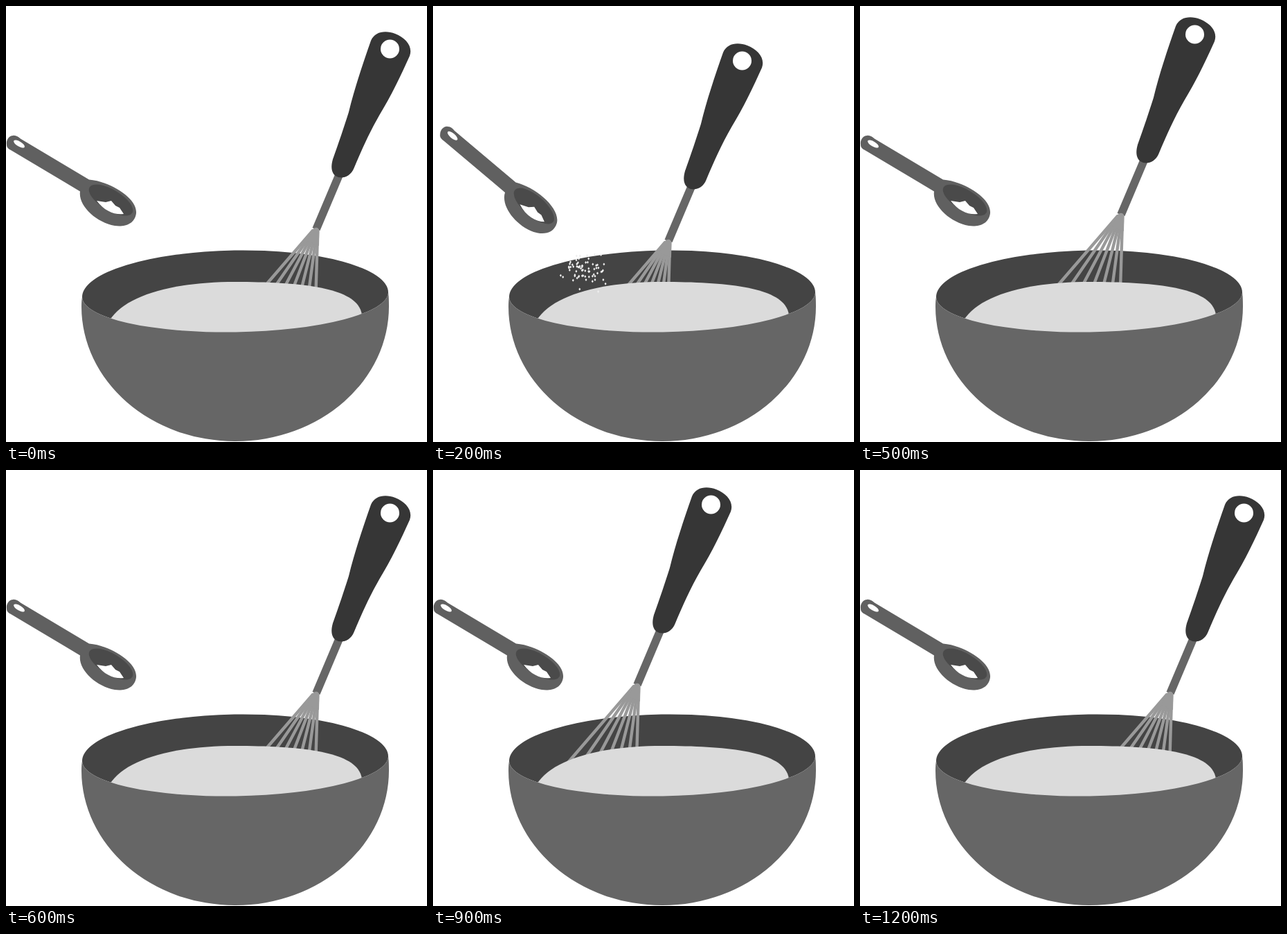
An HTML page for the animation above (1300 ms loop, 608 by 629 pixels).

```html
<!DOCTYPE html>
<html lang="en">
<head>
<meta charset="utf-8">
<title>Whisking</title>
<style>
html, body { margin: 0; width: 100%; height: 100%; overflow: hidden; background: #fff; }
svg { display: block; width: 100%; height: 100%; }
</style>
</head>
<body>
<svg viewBox="0 0 608 629">
  <path fill="#444" d="M110 420A221 64 -.9 0 1 552 413A221 54 -.9 0 1 110 420Z"/>

  <g id="whisk">
    <path fill="#666" d="M475.5 242L486.5 246L453.5 324L442.5 320Z"/>
    <g id="wires" stroke="#999" stroke-width="4.4" stroke-linecap="round"></g>
    <path fill="#999" d="M440.5 327C443 319 451 317 452.5 324L452 346L435 339Z"/>
    <path fill="#363636" d="M527 50C533 36 549 35 562 40C577 46 588 58 583 72C570 101 556 130 539.5 157C525 182 513 209 502.5 234C498 245 488 249 480 247C471 244 468 235 472 221C480 199 489 172 495 153C503 120 515 84 527 50Z"/>
    <circle cx="554.5" cy="62" r="13.5" fill="#fff"/>
  </g>

  <path fill="#dbdbdb" d="M150 453C172 418 240 398 331 398C436 398 510 408 514 446L508 465L331 480L160 470Z"/>
  <g id="sugar" fill="#eee"></g>
  <path fill="#666" d="M110 420Q109 425 109 434A222 194.5 0 0 0 553 433Q553 420 552 413A221 54 -.9 0 1 110 420Z"/>

  <g id="spoon">
    <path fill="#606060" d="M1 200C0 194 4 187 10 187C14 186 18 189 21 191.6L120 250.6C150 253 190 277 188 299C186 315 171 319 157 317C130 312 104 288 107 267.4L8 208.4C3 206 1 204 1 200Z"/>
    <ellipse cx="19" cy="199" rx="9" ry="3.6" fill="#fff" transform="rotate(31 19 199)"/>
    <ellipse cx="151.5" cy="280" rx="36" ry="15" fill="#4a4a4a" transform="rotate(31 151.5 280)"/>
    <path fill="#fff" d="M131 281L144 283L152 281L158 288L164 291L170 300C158 302 142 296 131 281Z"/>
  </g>
</svg>
<script>
const STEP = 100, STEPS = 13;
const get = id => document.getElementById(id);
const whisk = get('whisk'), spoon = get('spoon'), sugar = get('sugar');

// Whisk offsets around one stir
const stir = [[0, 0], [-52, 19], [-108, 17], [-153, -12], [-115, -27], [-71, -21]];

let wires = '';
for (let i = 0; i < 7; i++) {
  wires += `<line x1="${443 + 1.2 * i}" y1="324" x2="${338.5 + 23.1 * i - 0.85 * i * i}" y2="445"/>`;
}
get('wires').innerHTML = wires;

let seed = 17;
const rand = () => (seed = (seed * 16807) % 2147483647) / 2147483647;
const spread = () => rand() + rand() + rand() - 1.5;

let grains = '';
for (let i = 0; i < 68; i++) {
  const x = 219 + spread() * 29, y = 381 + spread() * 22;
  grains += `M${x.toFixed(1)} ${(y - 2).toFixed(1)}l1.5 2l-1.5 2l-1.5 -2z`;
}
sugar.innerHTML = `<path d="${grains}"/>`;

function draw(ms) {
  const n = Math.floor(ms / STEP) % STEPS;
  whisk.setAttribute('transform', `translate(${stir[n % 6]})`);
  const tipped = n === 1 || n === 2;
  spoon.setAttribute('transform', tipped ? 'translate(1.5 -2) rotate(9.3 83 241.5)' : '');
  const falling = n >= 1 && n <= 3;
  sugar.setAttribute('visibility', falling ? 'visible' : 'hidden');
  sugar.setAttribute('transform', `translate(${(n - 2) * 4.5} ${(n - 2) * 41})`);
}

const start = performance.now();
function tick() {
  draw(performance.now() - start);
  requestAnimationFrame(tick);
}
tick();
</script>
</body>
</html>
```
